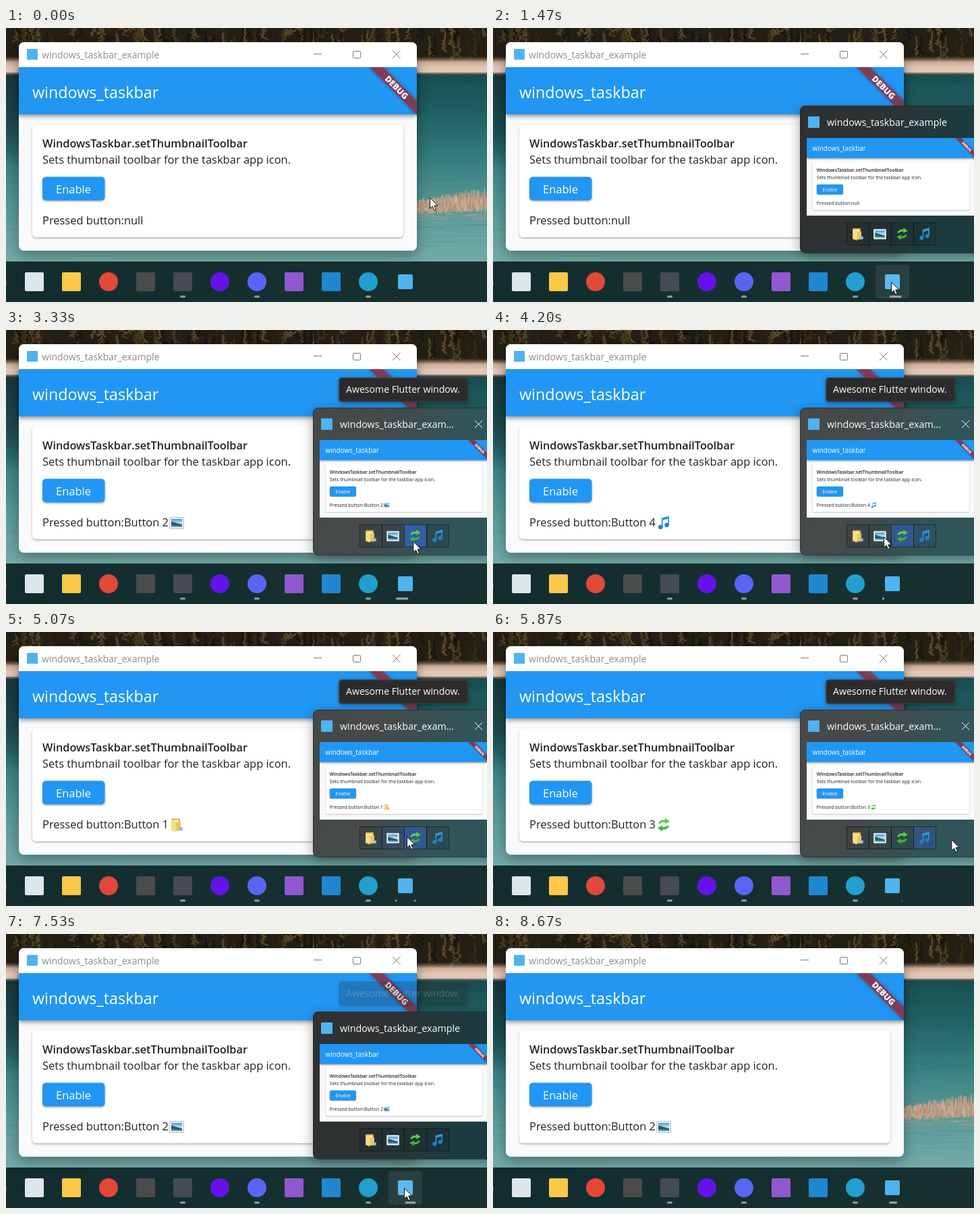
Recreate the animation shown at these times as an HTML page with a canvas. Size 713x406 px, loop 8.74 s.

```html
<!DOCTYPE html>
<html lang="en">
<head>
<meta charset="utf-8">
<title>windows_taskbar</title>
<style>
html, body { margin: 0; width: 100%; height: 100%; overflow: hidden; background: #142e30; }
canvas { display: block; }
</style>
</head>
<body>
<canvas id="stage" width="713" height="406"></canvas>
<script>
const W = 713, H = 406, LOOP = 8740, TASKBAR = 346;
const BLUE = '#2196f3', INK = '#212121', LOGO = '#4fb3f0';
const FONT = '"Open Sans", "Noto Sans", sans-serif';
const ctx = document.getElementById('stage').getContext('2d');

const clamp = v => Math.max(0, Math.min(1, v));
const ramp = (t, a, b) => clamp((t - a) / (b - a));
const smooth = p => p * p * (3 - 2 * p);
const mix = (a, b, p) => a + (b - a) * p;

// Toolbar buttons 1 to 4
const BUTTON = 33;
const buttonLeft = id => 524 + BUTTON * (id - 1);
const atButton = id => [buttonLeft(id) + BUTTON / 2, 306];
const APP_ICON = [590, 376], PAST_EDGE = [692, 308];

// Pointer stops: arrival time, place, button pressed there
const STOPS = [
  [0, [628, 251]],
  [500, APP_ICON],
  [1820, [573, 299]],
  [2170, atButton(1), 1],
  [2960, atButton(2), 2],
  [3360, [604, 313], 3],
  [3850, atButton(4), 4],
  [4350, atButton(1), 1],
  [5030, [594, 303], 3],
  [5950, PAST_EDGE],
  [6300, atButton(4), 4],
  [6770, atButton(2), 2],
  [7350, APP_ICON],
  [8470, [682, 350]]
];
const MOVE = 350, PRESS_DELAY = 120, POINTER_GONE = 8600;

function pointer(t) {
  let [x, y] = STOPS[0][1];
  for (const [arrive, [px, py]] of STOPS) {
    const p = smooth(ramp(t, arrive - MOVE, arrive));
    x = mix(x, px, p);
    y = mix(y, py, p);
  }
  return [x, y];
}

function pressedAt(t) {
  const done = STOPS.filter(([arrive, , id]) => id && t >= arrive + PRESS_DELAY);
  return done.length ? done[done.length - 1][2] : 0;
}

// Share of the recent past the pointer spent inside a box
function hover(t, x, y, w, h) {
  let n = 0;
  for (let lag = 30; lag <= 120; lag += 30) {
    const [px, py] = pointer(t - lag);
    if (px >= x && px < x + w && py >= y && py < y + h) n++;
  }
  return n / 4;
}

function box(g, x, y, w, h, r, fill) {
  g.beginPath();
  g.roundRect(x, y, w, h, r);
  g.fillStyle = fill;
  g.fill();
}

function outline(g, x, y, w, h, r, color) {
  g.beginPath();
  g.roundRect(x, y, w, h, r);
  g.strokeStyle = color;
  g.lineWidth = 1;
  g.stroke();
}

function disc(g, x, y, r, fill) {
  g.beginPath();
  g.arc(x, y, r, 0, 7);
  g.fillStyle = fill;
  g.fill();
}

function poly(g, pts, fill) {
  g.beginPath();
  pts.forEach(([x, y]) => g.lineTo(x, y));
  g.closePath();
  g.fillStyle = fill;
  g.fill();
}

function line(g, x0, y0, x1, y1, color, width = 1) {
  g.beginPath();
  g.moveTo(x0, y0);
  g.lineTo(x1, y1);
  g.strokeStyle = color;
  g.lineWidth = width;
  g.stroke();
}

function cross(g, x, y, size, color) {
  line(g, x, y, x + size, y + size, color);
  line(g, x + size, y, x, y + size, color);
}

function text(g, s, x, y, size, color, weight = 400, align = 'left') {
  g.font = `${weight} ${size}px ${FONT}`;
  g.textAlign = align;
  g.fillStyle = color;
  g.fillText(s, x, y);
}

function shadow(g, alpha, blur, dy) {
  g.shadowColor = `rgba(0,0,0,${alpha})`;
  g.shadowBlur = blur;
  g.shadowOffsetY = dy;
}

// Evenly spaced colours
function gradient(g, x0, y0, x1, y1, ...colors) {
  const fill = g.createLinearGradient(x0, y0, x1, y1);
  colors.forEach((c, i) => fill.addColorStop(i / (colors.length - 1), c));
  return fill;
}

function group(g, draw) {
  g.save();
  draw();
  g.restore();
}

// Small pictures in a 22 px box
const ICONS = {
  1(g) {
    box(g, 3, 2, 13, 18, 1, '#d9a93c');
    box(g, 6, 4, 8, 15, 0, '#fff3c8');
    poly(g, [[3, 3], [10, 6], [10, 22], [3, 19]], '#f7dc85');
    box(g, 10, 7, 7, 13, 0, '#efc65c');
    box(g, 15, 15, 5, 5, 1, '#8fbfe0');
  },
  2(g) {
    box(g, 0.5, 3, 21, 17, 1, '#8a9aa6');
    box(g, 1.2, 3.7, 19.6, 15.6, 0, '#f4f7f9');
    box(g, 3, 5.5, 16, 12, 0, gradient(g, 0, 5, 0, 18, '#3f8fd6', '#b9e0f3', '#3d8cc0'));
    poly(g, [[3, 9], [19, 14], [19, 16], [3, 15]], '#2d5d59');
  },
  3(g) {
    for (const color of ['#5bcf45', '#3fb535']) {
      poly(g, [[13, 1], [20, 6], [13, 10]], color);
      line(g, 4, 9, 8, 6, color, 3);
      line(g, 7, 6, 14, 5.5, color, 3.5);
      g.translate(22, 22);
      g.rotate(Math.PI);
    }
  },
  4(g) {
    poly(g, [[8, 4], [19, 1], [19, 5], [8, 8]], '#2f9be0');
    for (const [x, y] of [[8.8, 17.5], [18.1, 14.5]]) {
      line(g, x, y, x, y - 12, '#2f9be0', 1.8);
      disc(g, x - 2.5, y, 3.3, '#1d83d0');
    }
  }
};

function icon(g, id, x, y, size) {
  group(g, () => {
    g.translate(x, y);
    g.scale(size / 22, size / 22);
    ICONS[id](g);
  });
}

let seed = 7;
const rnd = () => (seed = (seed * 16807) % 2147483647) / 2147483647;
const between = (a, b) => mix(a, b, rnd());
const pick = list => list[Math.floor(rnd() * list.length)];

function paintForest(g) {
  box(g, 0, 0, W, 52, 0, '#241f15');
  const tones = ['#16150e', '#2a2517', '#3a3019', '#4d3f22', '#5e4c2b'];
  for (let i = 0; i < 150; i++) {
    const x = between(0, W), top = between(-30, 18), tone = pick(tones);
    for (let d = 0; d < 30; d += 2) {
      const w = 1 + d * 0.25;
      line(g, x, top + d, x + between(-w, w), top + d + 3, tone, 2);
    }
  }
}

function paintReeds(g) {
  for (let i = 0; i < 700; i++) {
    const x = between(600, W), lift = (x - 600) / 8;
    const y = between(262, 276) - lift * 0.3, h = between(4, 9 + lift);
    line(g, x, y, x + between(-3, 3), y - h, pick(['#c3a48a', '#cfb096', '#b3957c', '#a89280']), 1.3);
  }
  for (let i = 0; i < 50; i++) {
    box(g, between(600, W), between(268, 284), between(8, 24), 1, 0, 'rgba(185,160,138,.45)');
  }
}

function paintBackdrop(g) {
  box(g, 0, 68, W, 278, 0, gradient(g, 0, 68, 0, TASKBAR,
    '#174e51', '#1f5f61', '#2f7777', '#488e8d', '#609f9d', '#72aba8'));
  for (let i = 0; i < 160; i++) {
    box(g, between(-40, W), between(72, TASKBAR), between(20, 90), 1, 0,
      pick(['rgba(255,255,255,.035)', 'rgba(0,20,24,.07)']));
  }
  box(g, 0, 68, 40, 140, 0, gradient(g, 0, 68, 0, 208, '#16373a', '#1a474a', 'rgba(26,71,74,0)'));
  paintForest(g);
  box(g, 0, 42, W, 25, 0, gradient(g, 0, 42, 0, 67, 'rgba(150,118,94,0)', '#c9a993', '#e3c8b6', '#dfc5b3'));
  box(g, 0, 66, W, 4, 0, gradient(g, 0, 66, 0, 70, '#a08c7d', '#143c3f'));
  paintReeds(g);
}

// One stand-in mark per app; round ones and running ones by position
const APPS = ['#dfe6ea', '#fcc84a', '#e2483a', '#4b4b4b', '#454b50',
  '#6512ea', '#5865f2', '#9258cf', '#1f86d0', '#219fd0', LOGO];
const ROUND = [2, 5, 6, 9], RUNNING = [4, 6, 9];

function paintTaskbar(g) {
  box(g, 0, TASKBAR, W, 60, 0, gradient(g, 0, 0, W, 0, '#132d2e', '#152f30', '#18302f'));
  disc(g, -7, 378, 8, '#c8452f');
  APPS.forEach((color, i) => {
    const x = 42 + 55 * i, r = color === LOGO ? 11 : 14;
    if (ROUND.includes(i)) disc(g, x, 376, r, color);
    else box(g, x - r, 376 - r, 2 * r, 2 * r, 2, color);
    if (RUNNING.includes(i)) box(g, x - 4, 396.5, 8, 3, 1.5, '#98a2a2');
  });
}

function paintFrame(g) {
  group(g, () => {
    shadow(g, 0.35, 20, 6);
    box(g, 19, 21, 590, 309, 8, '#fafafa');
  });
  box(g, 19, 21, 590, 37, [8, 8, 0, 0], '#fff');
  box(g, 31, 31, 16, 16, 1, LOGO);
  text(g, 'windows_taskbar_example', 53, 45, 14, '#8c8c8c');
  line(g, 456, 38.5, 468, 38.5, '#777');
  outline(g, 514.5, 34.5, 11, 10, 1, '#777');
  cross(g, 573, 33.5, 11.5, '#777');
}

// App content, 590 by 272; k is the scale used for the shadows
function paintApp(g, pressed, k) {
  box(g, 0, 0, 590, 272, k === 1 ? [0, 0, 8, 8] : 0, '#fafafa');
  group(g, () => {
    shadow(g, 0.4, 6 * k, 3 * k);
    box(g, 0, 0, 590, 70, 0, BLUE);
  });
  text(g, 'windows_taskbar', 20, 46, 23.3, '#fff');

  group(g, () => {
    shadow(g, 0.3, 3 * k, 1.5 * k);
    box(g, 20, 85, 550, 167, 5, '#fff');
  });
  text(g, 'WindowsTaskbar.setThumbnailToolbar', 35, 119, 16.27, INK, 600);
  text(g, 'Sets thumbnail toolbar for the taskbar app icon.', 35, 143, 16.5, INK);
  group(g, () => {
    shadow(g, 0.32, 3 * k, 1.5 * k);
    box(g, 35, 162.5, 92.5, 35, 5, BLUE);
  });
  text(g, 'Enable', 81, 187, 16.5, '#fff', 400, 'center');
  const state = pressed ? 'Button ' + pressed : 'null';
  text(g, 'Pressed button:' + state, 35, 233, 16.45, INK);
  if (pressed) icon(g, pressed, 223, 216.5, 22);

  group(g, () => {
    g.beginPath();
    g.rect(0, 0, 590, 272);
    g.clip();
    g.translate(590, 0);
    g.rotate(Math.PI / 4);
    shadow(g, 0.35, 6 * k, 0);
    box(g, -50, 35, 100, 15, 0, 'rgba(183,28,28,.627)');
    g.shadowColor = 'transparent';
    text(g, 'DEBUG', 0, 47, 12.4, '#fff', 800, 'center');
  });
}

function paintThumbnail(g, pressed) {
  const k = 250 / 590;
  group(g, () => {
    g.beginPath();
    g.rect(465, 163, 250, 115);
    g.clip();
    g.translate(465, 163);
    g.scale(k, k);
    paintApp(g, pressed, k);
  });
}

function paintButton(g, t, id) {
  const x = buttonLeft(id), lit = hover(t, x, 286, BUTTON, 38);
  box(g, x, 288, BUTTON, 34, 0, 'rgba(0,0,0,.1)');
  box(g, x, 288, BUTTON, 34, 0, `rgba(52,98,184,${0.85 * lit})`);
  outline(g, x + 0.5, 288.5, BUTTON, 33, 0, 'rgba(15,18,20,.6)');
  icon(g, id, x + 6.5, 295, 20);
}

function paintPreview(g, t, pressed) {
  const alpha = ramp(t, 860, 1060) * (1 - ramp(t, 8120, 8340));
  if (alpha <= 0) return;
  const over = t >= 1700 && t < 7200;
  const tint = over ? ['#474849', '#454a4b', '#2f5558'] : ['#303132', '#2e3233', '#1c3b3e'];
  group(g, () => {
    g.globalAlpha = alpha;
    g.translate(0, 26 * Math.pow(1 - ramp(t, 860, 1120), 3));
    group(g, () => {
      shadow(g, 0.35, 18, 5);
      box(g, 455, 115, 280, 218.5, 8, gradient(g, 455, 0, 713, 60, ...tint));
    });
    outline(g, 455.5, 115.5, 280, 218, 8, 'rgba(30,34,36,.6)');
    box(g, 467, 131, 17, 17, 1, LOGO);
    text(g, over ? 'windows_taskbar_exam...' : 'windows_taskbar_example', 495, 145, 14.3, '#fff');
    if (over) cross(g, 695, 134, 11, '#fff');
    paintThumbnail(g, pressed);
    for (let id = 1; id <= 4; id++) paintButton(g, t, id);
  });
}

function paintTooltip(g, t) {
  const alpha = ramp(t, 1975, 2200) * (1 - ramp(t, 7350, 7580));
  if (alpha <= 0) return;
  group(g, () => {
    g.globalAlpha = alpha;
    group(g, () => {
      shadow(g, 0.35, 6, 2);
      box(g, 493.5, 70.5, 192, 36, 4, '#2b2b2b');
    });
    outline(g, 494, 71, 191, 35, 4, '#484848');
    text(g, 'Awesome Flutter window.', 504, 93, 14.1, '#fff');
  });
}

// Two bars chase each other under the icon every two seconds
function paintProgress(g, t) {
  const x = 577, w = 30, p = (t + 40) % 2000;
  const bar = (share, from, to, a, b) =>
    box(g, x + mix(from, to, smooth(ramp(p, a, b))), 396.5, w * share, 3, 1.5, '#a3a8a9');
  group(g, () => {
    g.beginPath();
    g.rect(x, 396, w, 4);
    g.clip();
    bar(0.4, -12, 36, 0, 1500);
    bar(0.6, -27, 30, 750, 2000);
  });
  box(g, x, 398, 1, 1, 0, '#7d8686');
}

function paintCursor(g, t) {
  if (t >= POINTER_GONE) return;
  const [x, y] = pointer(t);
  group(g, () => {
    g.translate(x + 0.5, y + 0.5);
    g.lineJoin = 'round';
    poly(g, [[0, 0], [0, 16], [3.7, 12.6], [6.2, 18.4], [8.7, 17.3], [6.2, 11.6], [11.2, 11.6]], '#fff');
    g.strokeStyle = '#111';
    g.lineWidth = 1;
    g.stroke();
  });
}

const backdrop = document.createElement('canvas');
backdrop.width = W;
backdrop.height = H;
const back = backdrop.getContext('2d');
paintBackdrop(back);
paintFrame(back);
paintTaskbar(back);

function draw(t) {
  const pressed = pressedAt(t);
  ctx.drawImage(backdrop, 0, 0);
  group(ctx, () => {
    ctx.translate(19, 58);
    paintApp(ctx, pressed, 1);
  });
  box(ctx, 567, 351, 50, 50, 4, `rgba(255,255,255,${0.08 * hover(t, 567, 351, 50, 50)})`);
  paintProgress(ctx, t);
  paintTooltip(ctx, t);
  paintPreview(ctx, t, pressed);
  paintCursor(ctx, t);
}

const start = performance.now();
function tick() {
  draw((performance.now() - start) % LOOP);
  requestAnimationFrame(tick);
}
tick();
</script>
</body>
</html>
```
